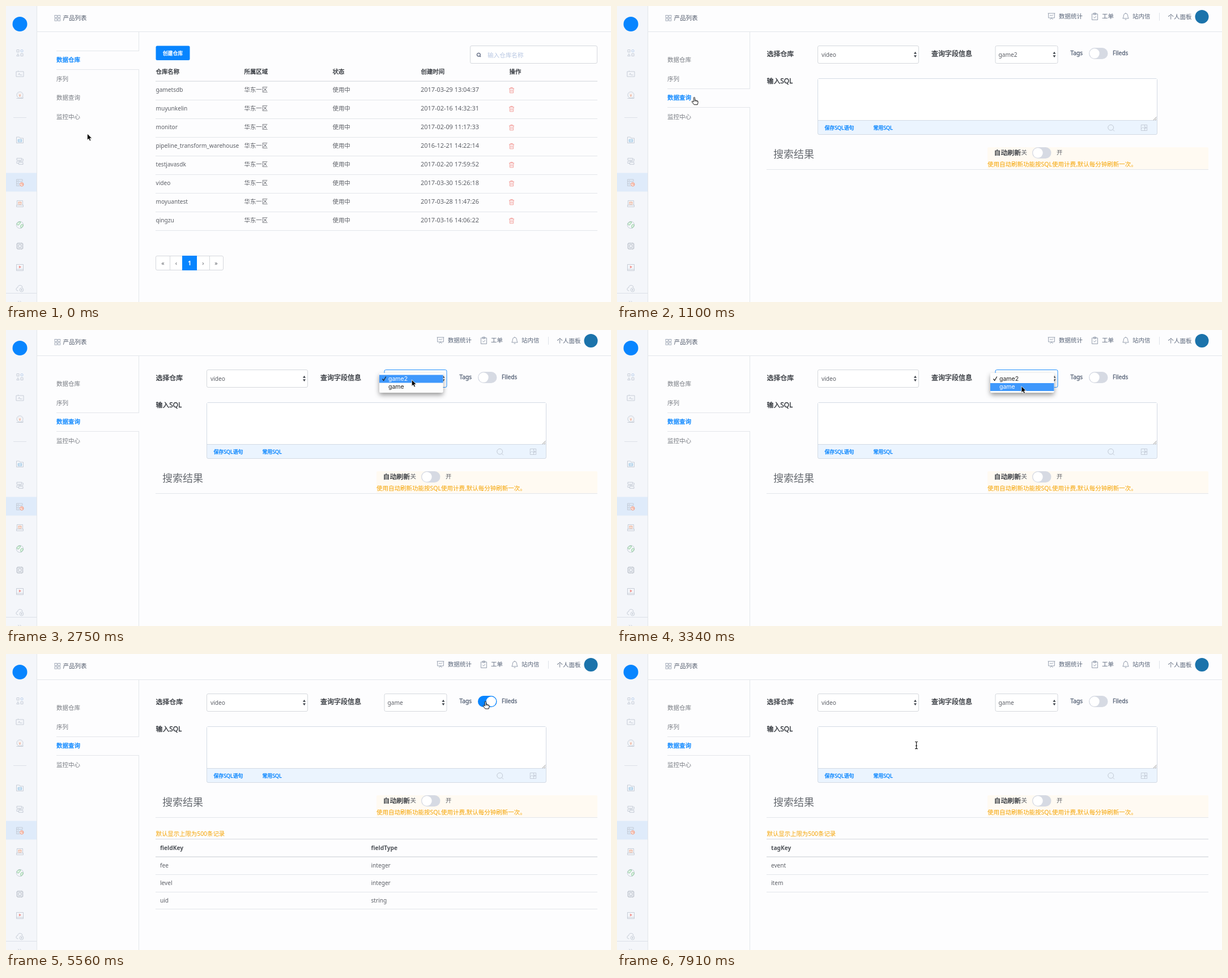
Animation, 1068 px wide and 524 px high, one loop 8 s. Source, as an HTML page:

```html
<!DOCTYPE html>
<html lang="zh-CN">
<head>
<meta charset="utf-8">
<title>数据查询</title>
<style>
html, body { margin: 0; width: 100%; height: 100%; overflow: hidden; background: #fdfdfe; }
svg { display: block; width: 100%; height: 100%; }
text { font-family: "Noto Sans", "Noto Sans CJK SC", "Noto Sans CJK", sans-serif; white-space: pre; }
.menu { font-family: Inter, sans-serif; }
</style>
</head>
<body>
<svg id="stage" viewBox="0 0 1068 524"></svg>
<script>
const BLUE = '#0885ff', INK = '#5c5f66', DARK = '#33373d', RULE = '#e3e6ea', GREY = '#bcc3cf', ORANGE = '#f5a300', RED = '#f08a84';

const box = (x, y, w, h, fill, extra = '') => `<rect x="${x}" y="${y}" width="${w}" height="${h}" fill="${fill}" ${extra}/>`;
const frame = (x, y, w, h, stroke = '#d5d8dd', fill = '#fff', id = '') =>
  box(x + .5, y + .5, w - 1, h - 1, fill, `rx="2.5" stroke="${stroke}" ${id && `id="${id}"`}`);
const hline = (x1, x2, y, color = RULE, h = 1) => box(x1, y, x2 - x1, h, color);
const vline = (x, y1, y2, color = RULE) => box(x, y1, 1, y2 - y1, color);
const text = (x, y, s, size = 10.4, fill = INK, extra = '') =>
  `<text x="${x}" y="${y}" font-size="${size}" fill="${fill}" ${extra}>${s}</text>`;
const bold = 'font-weight="600"', mid = 'text-anchor="middle"';
// Medium weight: regular glyphs thickened by a hairline.
const strong = (x, y, s, size, fill, extra = '') => text(x, y, s, size, fill, `stroke="${fill}" stroke-width=".35" ${extra}`);
const path = (d, stroke = GREY, w = .8, fill = 'none') =>
  `<path d="${d}" fill="${fill}" stroke="${stroke}" stroke-width="${w}" stroke-linejoin="round"/>`;
const ring = (x, y, r, stroke = GREY, fill = 'none') => `<circle cx="${x}" cy="${y}" r="${r}" fill="${fill}" stroke="${stroke}" stroke-width=".8"/>`;
const group = (id, body, hidden) => `<g id="${id}" ${hidden ? 'display="none"' : ''}>${body}</g>`;
const at = (x, y, body) => `<g transform="translate(${x} ${y})">${body}</g>`;

// Left icon rail; every icon is drawn around its own centre.
const accent = '#f0a27e';
const icons = [
  [83, path('M-5.5-5.5h4v4h-4ZM1.5 1.5h4v4h-4Z') + ring(3.5, -3.5, 2.1, '#a9c4e8') + path('M-3.5 1.3L-1.3 5.5H-5.7Z')],
  [120.5, path('M-6.5-4.5h13v9h-13ZM-3-4.5V-6') + path('M-3 1.5L-1-1.5L0 1.5H4')],
  [158, ring(0, -.5, 5.5) + path('M-2-2.5L0-.5L2-2.5M0-.5V3M-2 .7H2', accent) + path('M-6 5.5H6M3 6L6.5 3')],
  [237.5, path('M-6 5V-5.5H-1L.5-3.5H6V5Z') + path('M-3.2-1.3H3.2V3H-3.2ZM-3.2.8H3.2', '#86bbe0')],
  [275, path('M-5.5-5.5H3V-2H-5.5ZM-2 2H5.5V5.5H-2ZM5.5-4V0H-5.5V3.5H-2M-2-.2H2M4-5L6.5-3')],
  [313, path('M-6-6H4.5V-2.5H-6ZM-6-2.5V1.5H0M-6 1.5V5.5H0M-4-4.2H-2M-4-.5H-2M-4 3.5H-2') + ring(3.3, 2.8, 3.2, '#ee8062', '#fbe6df') + path('M3.3.5V2.8H6', '#ee8062')],
  [350, path('M-5 2.5V-5.5H5V2.5M-6 2.5H6V5.5H-6Z') + path('M-2.5-3L0-1L2.5-3M-2.5-3H2.5V1H-2.5Z', accent)],
  [387.5, ring(0, 0, 6.2) + path('M-5.5-2Q-3-6 1-5.5Q2-3-.5-2.5Q-1 .5-4 .5ZM2 0Q5-2 5.8.5Q5 4 2 5.4Q0 3 2 0Z', '#7cc58f', .8, '#e3f3e6')],
  [425, path('M-4.8-4.8H4.8V4.8H-4.8ZM-2.4-2.4H2.4V2.4H-2.4ZM-3-6.2V-4.8M0-6.2V-4.8M3-6.2V-4.8M-3 4.8V6.2M0 4.8V6.2M3 4.8V6.2M-6.2-3H-4.8M-6.2 0H-4.8M-6.2 3H-4.8M4.8-3H6.2M4.8 0H6.2M4.8 3H6.2', '#a8afbc')],
  [463, path('M-6-5.5H6V5.5H-6ZM-6 3.2H6') + path('M-1.2-3L2-1L-1.2 1Z', RED, .5, RED)],
  [500, path('M-3 4H-4.5Q-7 3.5-6.5.5Q-6-1.5-4-1.5Q-3-6 1-5.5Q4.5-5 4.5-1.5') + ring(3, 2.5, 3.3) + path('M1.5 2.5H4.5M3 1V4')]
];

const rail = box(0, 0, 54, 524, '#f4f6fa') + box(0, 295.5, 54, 33, '#dfebfa') + vline(54, 0, 524)
  + `<circle cx="24.5" cy="32" r="13" fill="${BLUE}"/>`
  + hline(13, 36, 197, '#dde1e8') + icons.map(([y, d]) => at(24.5, y, d)).join('')
  + box(0, 508, 54, 16, '#f4f6fa') + hline(0, 54, 508, '#dde1e8') + path('M21 522l2.5 2.5l-2.5 2.5M24.5 522l2.5 2.5l-2.5 2.5');

const gridIcon = [[86, 16.5], [91.7, 16.5], [86, 22.2], [91.7, 22.2]]
  .map(([x, y]) => box(x, y, 4, 4, 'none', 'stroke="#8d97a8" stroke-width=".8"')).join('');
const slate = '#596579';
const nav = at(767, 18.5, path('M-6.3-5.5H6.3M-5.3-5.5V2.5H5.3V-5.5M-2.5 5.5L0 2.5L2.5 5.5M-3-.5L-1-2.5L.7-.8L3-3', '#7d889b'))
  + text(780, 22, '数据统计', 10.5, slate)
  + at(843.5, 18.5, path('M-5-4.5H5V6H-5ZM-2-6H2V-3.3H-2ZM-2.3 1L-.5 2.8L2.6-.6', '#7d889b'))
  + text(856, 22, '工单', 10.5, slate)
  + at(898, 18.5, path('M-5.2 3.5Q-3.7 2-3.7-1.5Q-3.5-5.2 0-5.5Q3.5-5.2 3.7-1.5Q3.7 2 5.2 3.5ZM-1.3 5.5H1.3M0-6.5V-5.5', '#7d889b'))
  + text(910, 22, '站内信', 10.5, slate)
  + vline(957, 12, 26, '#dfe2e8') + text(972.5, 23, '个人面板', 10.5, slate)
  + '<circle cx="1032.5" cy="19" r="12" fill="#1b73ab"/>';

const tabs = ['数据仓库', '序列', '数据查询', '监控中心'];
const tabY = i => 79 + Math.round(33.7 * i);
const sideTabs = tabs.map((s, i) => text(89, tabY(i) + 20.3, s, 10.5, '#777b82', `id="tab${i}" stroke-width=".35"`)).join('');
const tabEdge = i => vline(234, 45, tabY(i)) + hline(89, 235, tabY(i)) + hline(89, 235, tabY(i) + 33) + vline(234, tabY(i) + 33, 524);

const stores = [
  ['gametsdb', '2017-03-29 13:04:37'], ['muyunkelin', '2017-02-16 14:32:31'],
  ['monitor', '2017-02-09 11:17:33'], ['pipeline_transform_warehouse', '2016-12-21 14:22:14'],
  ['testjavasdk', '2017-02-20 17:59:52'], ['video', '2017-03-30 15:26:18'],
  ['moyuantest', '2017-03-28 11:47:26'], ['qingzu', '2017-03-16 14:06:22']
];
const trash = path('M-4.5-3H4.5M-1.7-3V-4.5H1.7V-3M-3.5-3L-3 4.8H3L3.5-3M-1.2-1V3M1.2-1V3', RED);
const storeRow = ([name, time], i) => {
  const y = 152 + 33 * i;
  return text(264.5, y - .5, name, 10.1) + text(420.5, y, '华东一区') + text(576.5, y, '使用中')
    + text(732, y - .5, time, 10.9) + at(892.5, y - 3, trash) + hline(264, 1044, y + 14);
};
const lens = (x, y, r, color, w) => path(`M${x - r} ${y}a${r} ${r} 0 1 1 ${2 * r} 0a${r} ${r} 0 1 1 ${-2 * r} 0M${x + r * .7} ${y + r * .7}l${r * .6} ${r * .6}`, color, w);

const listPage = tabEdge(0) + box(264.5, 70.5, 60, 25.5, BLUE, 'rx="2.5"')
  + strong(294.5, 86.5, '创建仓库', 8.9, '#fff', mid)
  + frame(819, 70, 225, 32) + lens(834.3, 86.2, 2.9, '#56627a', 1.3) + text(850, 90.7, '输入仓库名称', 10.6, '#b8c7e2')
  + ['仓库名称', '所属区域', '状态', '创建时间', '操作'].map((s, i) => strong(264.5 + 156 * i, 120.4, s, 10.4, DARK)).join('')
  + hline(264, 1044, 132.5, '#dfe2e6', 1.5) + stores.map(storeRow).join('')
  + frame(264, 442, 120, 26) + vline(289, 443, 467, '#d5d8dd') + vline(359, 443, 467, '#d5d8dd') + box(311, 442, 26, 26, BLUE)
  + [[277, '«'], [300.5, '‹'], [348, '›'], [371, '»']].map(([x, s]) => text(x, 458.5, s, 10.5, INK, mid)).join('')
  + text(324, 458.7, '1', 10.5, '#fff', `${mid} ${bold}`);

const toggle = (x, y, id) => box(x, y, 33.5, 20, '#d6dae3', 'rx="10"') + box(x, y, 33.5, 20, BLUE, `rx="10" opacity="0" id="${id}On"`)
  + `<circle id="${id}Knob" cx="${x + 10}" cy="${y + 10}" r="8.7" fill="#fff"/>`;
const spin = x => path(`M${x - 2.5} 84.8l2.5-4l2.5 4ZM${x - 2.5} 87.2l2.5 4l2.5-4Z`, 'none', 0, '#41464d');

const queryPage = tabEdge(2) + strong(264.5, 88.7, '选择仓库', 11.9, DARK) + frame(354, 70, 179, 32) + text(361, 89.6, 'video', 10.2) + spin(526.5)
  + strong(555, 88.7, '查询字段信息', 12, DARK) + frame(667.5, 70, 111, 32, '#d5d8dd', '#fff', 'field') + text(673.5, 89.6, 'game2', 10.2, INK, 'id="fieldText"') + spin(772)
  + strong(800.5, 87.3, 'Tags', 10.2, slate) + toggle(833, 74, 'kind') + strong(875, 87.3, 'Fileds', 10.2, slate)
  + strong(264.5, 136.6, '输入SQL', 11.9, DARK)
  + frame(354, 128, 600, 100, '#d3dae4', '#ebf4fe') + box(355, 129, 598, 73.5, '#fff') + hline(355, 953, 202, '#d3dae4')
  + path('M947 202l5.5-5.5M950 202l2.5-2.5', '#777')
  + strong(366.5, 218.5, '保存SQL语句', 8.9, BLUE) + strong(452.5, 218.5, '常用SQL', 8.9, BLUE)
  + lens(871.7, 215.2, 4.9, GREY, .9) + at(930.5, 215.5, path('M-5.2-5H5.2V5H-5.2ZM1-5V5M-5.2 2L-2-1L1 2M1 0H5.2M3-2V2'))
  + text(276, 269.3, '搜索结果', 18, '#666a70') + box(654, 250, 390, 39, '#fffaf2', 'rx="2"')
  + strong(665.5, 263.6, '自动刷新', 11.9, DARK) + text(713.5, 263.2, '关', 10.4) + toggle(733, 250, 'auto') + text(776, 263.2, '开', 10.4)
  + text(654, 284.2, '使用自动刷新功能按SQL使用计费,默认每分钟刷新一次。', 10.5, ORANGE) + hline(264, 1044, 289);

const result = (head, rows) => text(264.5, 322.3, '默认显示上限为500条记录', 10.4, ORANGE) + hline(264, 1044, 327, '#dcdfe3', 1.3)
  + head.map((s, i) => text(272 + 372.5 * i, 346.6, s, 10.2, '#50545a', bold)).join('') + hline(264, 1044, 358.3, '#dcdfe3', 1.6)
  + rows.map((row, r) => row.map((s, i) => text(272 + 372.5 * i, 378 + 31 * r, s, 10.1)).join('') + hline(264, 1044, 390 + Math.round(30.7 * r))).join('');

const menu = box(659, 76, 112.5, 35, '#fdfdfd', 'rx="3" filter="url(#shadow)"') + box(659, 80, 112.5, 14, '#3f98fc', 'id="pick"')
  + path('M664.5 86.5l2.2 3l4-7', '#222', 1.3)
  + ['game2', 'game'].map((s, i) => text(675, 89.8 + 14.4 * i, s, 10.5, '#222', `class="menu" id="option${i}"`)).join('');

const pointer = group('arrow', path('M0 0V11.4L2.6 9L4.3 13L6.4 12.1L4.7 8.2H8.2Z', '#fff', .8, '#000'))
  + group('hand', path('M-1.2 7.5V1a1.1 1.1 0 0 1 2.2 0V5q1.8-.8 2 .6q1.6-.6 1.9.7q1.6-.3 1.6 1.2V9.5L5.6 13H-.4L-4 8.4q-.7-1.3.5-1.6q1-.1 2.3 1.4ZM1 5V7.3M3 5.6V7.5M4.9 6.3V7.8', '#000', .9, '#fff'))
  + group('beam', path('M-2.5-6.3Q0-6.3 0-5V5Q0 6.3-2.5 6.3M2.5-6.3Q0-6.3 0-5M0 5Q0 6.3 2.5 6.3M-1.5 1H1.5', '#111', 1.1));

document.getElementById('stage').innerHTML =
  '<defs><filter id="shadow" x="-20%" y="-40%" width="140%" height="220%"><feDropShadow dx="0" dy="4" stdDeviation="4" flood-opacity=".4"/></filter></defs>'
  + box(0, 0, 1068, 524, '#fdfdfe') + rail + hline(55, 1068, 45) + gridIcon + text(100.5, 25.3, '产品列表', 10.5, '#50596a') + group('nav', nav)
  + group('list', listPage) + group('query', queryPage, true) + sideTabs
  + group('fields', result(['fieldKey', 'fieldType'], [['fee', 'integer'], ['level', 'integer'], ['uid', 'string']]), true)
  + group('tags', result(['tagKey'], [['event'], ['item']]), true) + group('menu', menu, true) + group('pointer', pointer);

const $ = id => document.getElementById(id);
const show = (id, on) => $(id).setAttribute('display', on ? 'inline' : 'none');
const set = (id, name, value) => $(id).setAttribute(name, value);

// The screen refreshes in bursts: start, end, number of steps.
const LOOP = 8000;
const bursts = [[150, 800, 5], [1100, 2010, 7], [2160, 3190, 8], [3340, 3340, 1], [4240, 5260, 8], [5410, 5560, 2], [6750, 6930, 2], [7560, 7910, 3]];
const ticks = [0, ...bursts.flatMap(([a, b, n]) => Array.from({ length: n }, (_, i) => a + (n > 1 ? i * (b - a) / (n - 1) : 0)))];

// Pointer path: time, x, y.
const route = [
  [0, 143.5, 226], [800, 135.5, 161], [1255, 137, 162], [1405, 170, 166], [1707, 355.5, 168.5], [2010, 639, 118],
  [2307, 784, 97], [2750, 716, 88], [3190, 716, 90], [3340, 714, 99.5], [4390, 714, 99.5], [4677, 815, 94],
  [5260, 838.5, 87], [5560, 846.5, 84], [6930, 846.5, 84], [7560, 810, 100], [7910, 528.5, 161.5]
];
function pointerAt(t) {
  const i = route.findIndex(k => k[0] > t);
  if (i < 0) return route[route.length - 1].slice(1);
  const [a, ax, ay] = route[i - 1], [b, bx, by] = route[i];
  const p = (t - a) / (b - a);
  return [ax + (bx - ax) * p, ay + (by - ay) * p];
}

function draw(now) {
  const t = ticks.filter(k => k <= now).pop();
  const [x, y] = pointerAt(t);
  const query = t >= 1100;
  const overTab = x > 89 && x < 234 && y >= 79 && y < 213 ? Math.floor((y - 79) / 33.7) : -1;
  const overSwitch = query && x >= 833 && x <= 866 && y >= 74 && y <= 94;
  const overSql = query && x >= 355 && x <= 954 && y >= 129 && y <= 203;

  show('nav', t >= 150);
  show('list', !query);
  show('query', query);
  tabs.forEach((_, i) => {
    const lit = i === (query ? 2 : 0) || i === overTab;
    set('tab' + i, 'fill', lit ? BLUE : '#777b82');
    set('tab' + i, 'stroke', lit ? BLUE : 'none');
  });

  const open = t >= 2740 && t < 4380;
  const choice = t < 3340 ? 0 : t < 4240 ? 1 : -1;
  show('menu', open);
  show('pick', open && choice >= 0);
  set('pick', 'y', choice > 0 ? 94 : 79.5);
  [0, 1].forEach(i => set('option' + i, 'fill', i === choice ? '#fff' : '#222'));
  set('field', 'stroke', t >= 2740 && t < 5100 ? '#2492ff' : '#d5d8dd');
  $('fieldText').textContent = t < 4380 ? 'game2' : 'game';

  const on = t < 5410 || t >= 6930 ? 0 : t < 5560 || t >= 6750 ? .5 : 1;
  set('kindOn', 'opacity', on);
  set('kindKnob', 'cx', 843 + 13.5 * on);
  show('fields', t >= 5560 && t < 6930);
  show('tags', t >= 6930);

  const hand = overTab >= 0 || overSwitch;
  show('hand', hand);
  show('beam', overSql);
  show('arrow', !hand && !overSql);
  set('pointer', 'transform', `translate(${x} ${y})`);
}

const start = performance.now();
function loop() {
  draw((performance.now() - start) % LOOP);
  requestAnimationFrame(loop);
}
loop();
</script>
</body>
</html>
```
